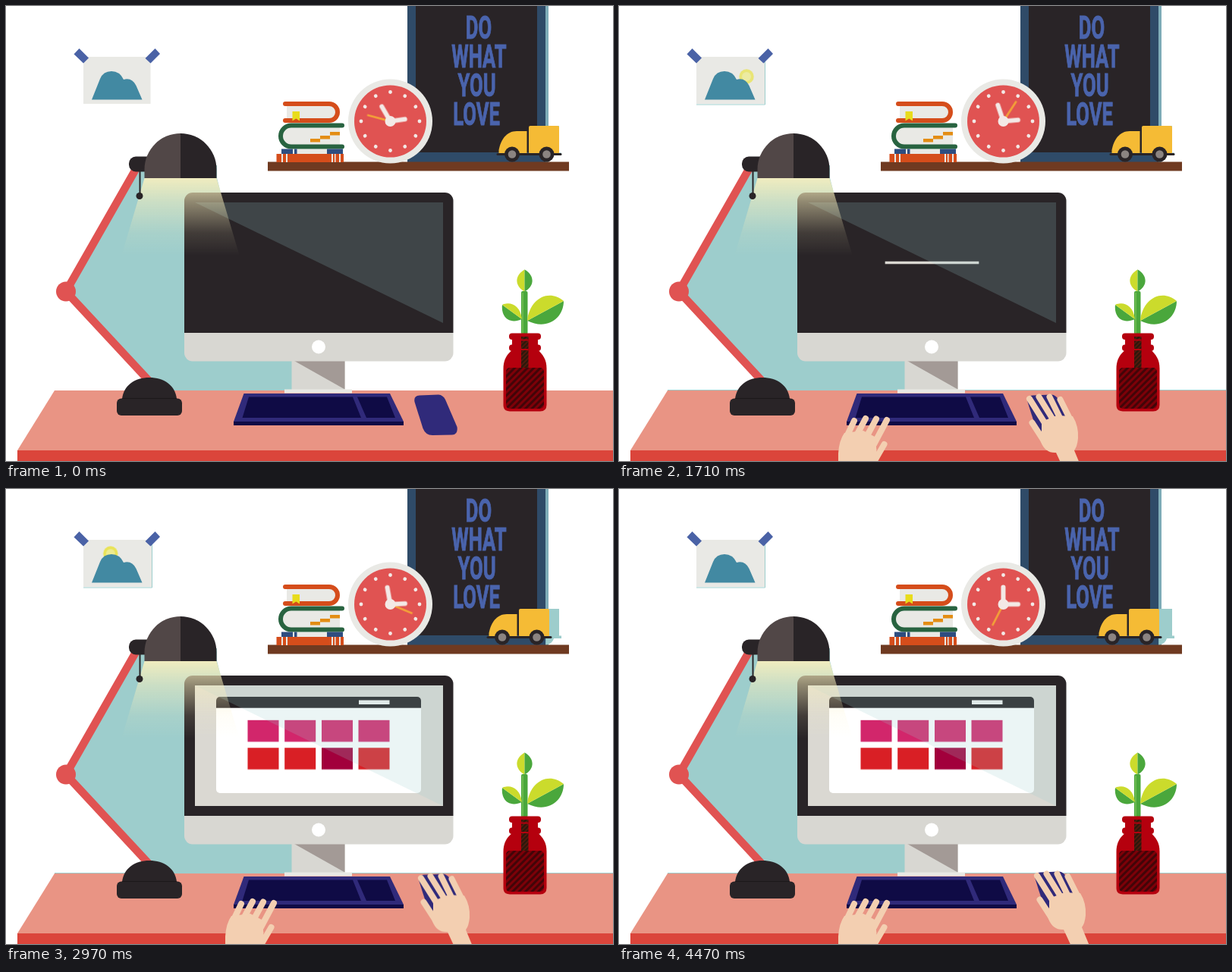
Recreate the animation shown at these times as an HTML page without scripts. Size 800x600 px, loop 4500 ms.

```html
<!DOCTYPE html>
<html lang="en">
<head>
<meta charset="utf-8">
<title>Desk</title>
<style>
html, body { margin: 0; width: 100%; height: 100%; overflow: hidden; background: #fff; }
svg { display: block; width: 100vw; height: 100vh; }

.anim { animation: 4500ms linear infinite both; }
.dark { fill: #292427; }
.teal { fill: #9dcdcc; }
.coral { fill: #e05352; }
.paper { fill: #e9e9e5; }
.orange { fill: #d54d1b; }
.navy { fill: #302a7a; }
.deep { fill: #0f0b45; }
.lime { fill: #cbdb2c; }
.green { fill: #4aa73c; }
.red { fill: #b5000e; }
.skin { fill: #f3cfb1; stroke: none; }
.fingers { fill: none; stroke: #f3cfb1; stroke-width: 8; stroke-linecap: round; }
.slogan { font: 700 42px Roboto, sans-serif; fill: #4a64ad; stroke: #4a64ad; text-anchor: middle; }

/* clock */
.tick { transform-origin: 506.5px 152px; animation-name: turn; }
@keyframes turn { from { transform: rotate(var(--from)); } to { transform: rotate(var(--to)); } }

/* truck backs up and returns */
.truck { animation-name: drive; animation-timing-function: ease-in-out; }
@keyframes drive {
  0%, 1.33%, 37.33%, 39.33%, 75.33%, 77.33% { transform: none; }
  16%, 23.33%, 54%, 61.33%, 92%, 100% { transform: translateX(-17px); }
}

/* sun rises and sets twice */
.sun { animation-name: sun; }
@keyframes sun {
  0%, 5.78%, 56.67% { transform: translate(-26px, 18px); opacity: 0; }
  16%, 66.9% { transform: translate(-12px, 5px); opacity: .85; }
  25.1%, 76% { transform: none; opacity: 1; }
  31.1%, 82% { transform: translate(9px, 4px); opacity: .9; }
  38%, 88.9% { transform: translate(17px, 14px); opacity: .62; }
  46.67%, 97.6%, 100% { transform: translate(26px, 27px); opacity: 0; }
}

/* screen opens from a line */
.panel { transform-origin: 412.5px 338.5px; animation-name: power; }
@keyframes power {
  0%, 35.33% { transform: scale(0, .022); }
  38% { transform: scale(.373, .022); }
  40.67% { transform: scale(1, .022); }
  44.67%, 100% { transform: none; }
}

.window { animation-name: rise; animation-timing-function: ease-in-out; }
@keyframes rise {
  0%, 45.33% { transform: translateY(150px); animation-timing-function: linear; }
  46.67% { transform: translateY(131px); animation-timing-function: ease-out; }
  52% { transform: translateY(-10px); }
  56.67% { transform: translateY(5px); }
  60.67%, 100% { transform: none; }
}

.tile { transform-box: fill-box; transform-origin: center; animation-name: pop; animation-delay: calc(var(--i) * 30ms); }
@keyframes pop {
  0%, 49.33% { transform: scale(0); }
  52% { transform: scale(.94); }
  53.33% { transform: scale(1.1); }
  54% { transform: scale(1.08); }
  54.67% { transform: scale(1.03); }
  56% { transform: scale(.96); }
  56.67% { transform: scale(.95); }
  60%, 100% { transform: none; }
}

/* hands */
.enter { animation-name: enter; animation-timing-function: ease-out; }
@keyframes enter { 0%, 2% { transform: translateY(100px); } 14%, 100% { transform: none; } }
.push { animation-name: push; animation-timing-function: ease-in-out; }
@keyframes push { 0%, 61% { transform: none; } 70%, 100% { transform: translate(10px, -8px); } }

.edge { animation-name: edge; animation-timing-function: step-end; }
@keyframes edge { 0% { opacity: 0; } .6%, 100% { opacity: 1; } }
</style>
</head>
<body>
<svg viewBox="0 0 800 600" preserveAspectRatio="none">
  <defs>
    <linearGradient id="glow" gradientUnits="userSpaceOnUse" x1="0" y1="227" x2="0" y2="330">
      <stop offset="0" stop-color="#fbf0bd" stop-opacity=".88"/>
      <stop offset=".3" stop-color="#fbf0bd" stop-opacity=".5"/>
      <stop offset=".7" stop-color="#fbf0bd" stop-opacity=".12"/>
      <stop offset="1" stop-color="#fbf0bd" stop-opacity="0"/>
    </linearGradient>
    <pattern id="hatch" width="6" height="6" patternUnits="userSpaceOnUse" patternTransform="rotate(45)">
      <rect width="6" height="6" fill="#7d0008"/>
      <rect width="3" height="6" fill="#420508"/>
    </pattern>
    <pattern id="stemHatch" width="4" height="4" patternUnits="userSpaceOnUse" patternTransform="rotate(45)">
      <rect width="4" height="4" fill="#5a1a0c"/>
      <rect width="2.4" height="4" fill="#2a180c"/>
    </pattern>
    <clipPath id="screen"><rect x="249" y="259" width="327" height="159"/></clipPath>
    <clipPath id="case"><rect x="235" y="246" width="354.5" height="222.5" rx="11"/></clipPath>
    <clipPath id="frame"><rect x="277" y="274" width="270" height="127" rx="5"/></clipPath>
    <clipPath id="shade"><path d="M182.500 227V215.500a47.500 47.500 0 0 1 95 0V227z"/></clipPath>
    <circle id="dot" cx="506.500" cy="113.500" r="2.400"/>
    <g id="dots"><use href="#dot"/><use href="#dot" transform="rotate(30 506.500 152)"/><use href="#dot" transform="rotate(60 506.500 152)"/></g>
    <rect id="tile" width="41" height="28.500"/>
  </defs>

  <!-- taped picture -->
  <rect class="paper" x="102" y="67" width="88.500" height="62"/>
  <g class="anim edge">
    <path class="paper" d="M190 67h2v62H102v-1h88z"/>
    <path d="M102 130H192.500V67" fill="none" stroke="#9dcdcc"/>
    <rect class="teal" x="64" y="506" width="736" height="1"/>
  </g>
  <g class="anim sun">
    <circle cx="151" cy="79" r="9.700" fill="#e9e22f"/>
    <circle cx="151" cy="79" r="6" fill="#eeec78"/>
  </g>
  <path d="M113 123.500L124 96Q128 86 139 86Q150 86 155 97Q166 94 171.500 105L179.500 123.500z" fill="#4289a2"/>
  <path d="M96.500 56L109 68.500L102 75.500L89.500 63.500zM196.500 56L203 63L190.500 75.500L183.500 69z" fill="#4a62a6"/>

  <!-- poster -->
  <rect x="529" width="182" height="206" fill="#2f4b68"/>
  <rect x="711" width="4" height="206" fill="#7fadb8"/>
  <rect class="dark" x="540" width="160" height="193"/>
  <g class="slogan">
    <text transform="translate(623 43) scale(.61 1)">DO</text>
    <text transform="translate(623.500 81) scale(.61 1)">WHAT</text>
    <text transform="translate(620.500 119) scale(.61 1)">YOU</text>
    <text transform="translate(620 156.500) scale(.61 1)">LOVE</text>
  </g>

  <!-- shelf and books -->
  <rect x="345" y="205.500" width="397" height="12" fill="#6f3a21"/>
  <path class="paper" d="M370 130H426a10 10 0 0 1 0 20H370zM440 158H376a13 13 0 0 0 0 27H440z"/>
  <g fill="none" stroke-width="6" stroke-linecap="round">
    <path d="M368 129H426a11 11 0 0 1 0 22H368" stroke="#d54d1b"/>
    <path d="M443 157.500H376a14 14 0 0 0 0 28H443" stroke="#286340"/>
  </g>
  <path d="M377.500 139h9.500v12.500l-4.700-3l-4.800 3z" fill="#e8dc1c"/>
  <path d="M401 175h13v4.500h-13zM414 171h13v4.500h-13zM427 166h13v4.500h-13z" fill="#e38d14"/>
  <rect class="paper" x="378" y="189" width="46" height="6"/>
  <path d="M363 188.500h15v7h-15zM380 188.500h3.500v7H380zM423 188.500h21v7h-21z" fill="#2e4d80"/>
  <rect class="orange" x="356.500" y="195" width="88.500" height="11"/>
  <path class="paper" d="M363 195h2v11h-2zM369 195h2v11h-2zM429 195h2v11h-2zM433 195h1.500v11H433zM439 195h2v11h-2z"/>

  <!-- clock -->
  <circle class="paper" cx="506.500" cy="152" r="55.500"/>
  <circle class="coral" cx="506.500" cy="152" r="47.500"/>
  <g fill="#f3e9e6">
    <use href="#dots"/>
    <use href="#dots" transform="rotate(90 506.500 152)"/>
    <use href="#dots" transform="rotate(180 506.500 152)"/>
    <use href="#dots" transform="rotate(270 506.500 152)"/>
  </g>
  <path class="anim tick" style="--from:285deg;--to:569deg" d="M506.500 152V120.500" stroke="#f4a636" stroke-width="2.500"/>
  <g stroke="#f3e9e6" stroke-width="6" stroke-linecap="round">
    <path class="anim tick" style="--from:-30deg;--to:0deg" d="M506.500 152V129.500"/>
    <path class="anim tick" style="--from:82deg;--to:90deg" d="M506.500 152V132.500"/>
  </g>
  <circle cx="506.500" cy="152" r="7" fill="#f3e9e6"/>

  <!-- truck -->
  <path class="teal" d="M711.500 158H729V193.500H732V197H722A10 10 0 0 1 711.500 205z"/>
  <g class="anim truck">
    <path d="M649.500 195V190C652 176 660 165 673 165H686.500V195z" fill="#f5bb35"/>
    <rect x="689" y="158" width="40" height="37" rx="2" fill="#f5bb35"/>
    <path d="M648 195.500H731" stroke="#292427" stroke-width="3" stroke-linecap="round"/>
    <g class="dark"><circle cx="667" cy="195.500" r="10"/><circle cx="712.500" cy="195.500" r="10"/></g>
    <g fill="#8b8481"><circle cx="667" cy="195.500" r="5.300"/><circle cx="712.500" cy="195.500" r="5.300"/></g>
  </g>

  <!-- desk -->
  <path class="teal" d="M175 205L79 376L190 500V507H377V460H240V250H284L278 227V210z"/>
  <path d="M64 507H800V586H15z" fill="#e99484"/>
  <rect x="15" y="586" width="785" height="14" fill="#db453b"/>

  <!-- monitor -->
  <rect x="376.500" y="468" width="70" height="38" fill="#d8d7d2"/>
  <path d="M380 468H446.500V505.500z" fill="#a39a96"/>
  <rect x="367" y="505.500" width="89" height="5" fill="#e9e9e4"/>
  <g clip-path="url(#case)">
    <rect class="dark" x="235" y="246" width="355" height="185"/>
    <rect x="235" y="431" width="355" height="38" fill="#d8d7d2"/>
  </g>
  <circle cx="412" cy="449.500" r="9" fill="#fff"/>
  <g clip-path="url(#screen)">
    <rect class="anim panel" x="249" y="259" width="327" height="159" fill="#dad8d2"/>
    <g class="anim window">
      <g clip-path="url(#frame)">
        <rect x="277" y="274" width="270" height="127" fill="#fff"/>
        <rect x="277" y="274" width="270" height="14.700" fill="#241e21"/>
      </g>
      <rect x="465" y="278.500" width="40.500" height="5.500" fill="#f2f2f0"/>
      <g fill="#d2266b">
        <use class="anim tile" style="--i:0" href="#tile" x="318.500" y="304.800"/>
        <use class="anim tile" style="--i:1" href="#tile" x="367.200" y="304.800"/>
        <use class="anim tile" style="--i:2" href="#tile" x="416" y="304.800"/>
        <use class="anim tile" style="--i:3" href="#tile" x="464.500" y="304.800"/>
      </g>
      <g fill="#d91f25">
        <use class="anim tile" style="--i:4" href="#tile" x="318.500" y="341.300"/>
        <use class="anim tile" style="--i:5" href="#tile" x="367.200" y="341.300"/>
        <use class="anim tile" style="--i:6" href="#tile" x="416" y="341.300" fill="#a2003c"/>
        <use class="anim tile" style="--i:7" href="#tile" x="464.500" y="341.300"/>
      </g>
    </g>
  </g>
  <path d="M249 259H576V418z" fill="#9dcdcc" opacity=".2"/>

  <!-- lamp -->
  <path d="M182.500 227H277.500L308 330H152z" fill="url(#glow)"/>
  <path d="M174 210L79 376.500L190 496" fill="none" stroke="#e05352" stroke-width="10.500"/>
  <circle class="coral" cx="79" cy="376.500" r="13"/>
  <rect class="dark" x="162" y="198.500" width="40" height="20" rx="9"/>
  <path d="M176.500 215V250" stroke="#292427" stroke-width="2"/>
  <circle class="dark" cx="176" cy="250.500" r="4.500"/>
  <g clip-path="url(#shade)">
    <rect x="182" y="168" width="48" height="60" fill="#514747"/>
    <rect class="dark" x="230" y="168" width="48" height="60"/>
  </g>
  <path class="dark" d="M153 518C155 500 170 490 189 490S223 500 225 518z"/>
  <rect class="dark" x="146" y="517.500" width="86" height="22.500" rx="6"/>
  <path d="M153 517.500H225" stroke="#1c181a"/>

  <!-- keyboard -->
  <path class="navy" d="M313.500 511H506L524 548H300z"/>
  <path class="deep" d="M300 548H524V553H300zM320 515.500H457L468 543H311.500zM463 515.500H502L513 543H475z"/>

  <!-- plant -->
  <rect class="green" x="679" y="376" width="8.500" height="57" rx="2"/>
  <path d="M681 378V432" stroke="#6cba51" stroke-width="2"/>
  <path class="lime" d="M683.500 347.500C669 356 671 370 683.500 376.500z"/>
  <path class="green" d="M683.500 347.500C698 356 696 370 683.500 376.500zM654 394C652 411 664 420 680 413zM687 415L735 389C735 412 713 428 687 415z"/>
  <path class="lime" d="M654 394C664 389 678 394 680 413zM687 415C690 386 715 372 735 389z"/>
  <g class="red">
    <rect x="663" y="431.500" width="42" height="8.500" rx="4"/>
    <rect x="667" y="438" width="34" height="20"/>
    <rect x="663" y="446.500" width="42" height="8.500" rx="4"/>
    <path d="M668 453C660 459 655.500 467 655.500 478V526q0 8.500 8.500 8.500H704q8.500 0 8.500-8.500V478C712.500 467 708 459 700 453z"/>
  </g>
  <rect x="679" y="436" width="9.500" height="41" fill="url(#stemHatch)"/>
  <path d="M679 440.500h9.500M679 453h9.500" stroke="#b5000e" stroke-width="2"/>
  <rect x="659" y="477" width="50" height="54" rx="5" fill="url(#hatch)"/>

  <!-- mouse and hands -->
  <g class="anim push">
    <path class="navy" d="M545 513.500L570 512.500Q576 513 579 519L594.500 555Q596 565 588 565.500L562 566Q553 566 549.500 557L538.500 522Q537 514 545 513.500z"/>
    <g class="anim enter">
      <path class="fingers" d="M541 518L563 553M553.500 515.500L573 547M567.500 515.500L582 545M581.500 519L596 548M544.500 549.500L561 575"/>
      <path class="skin" d="M557 548L577 540L598 541Q606 554 605 570Q604 581 600 586L612 615H588L576 589Q562 590 556 575Q553 567 557 560z"/>
    </g>
  </g>
  <g class="anim enter">
    <path class="fingers" d="M310 547L299 570M325 544L310 572M339 544.500L322 576M353 546L336 578M349.500 578L335 603"/>
    <path class="skin" d="M289 610V590Q290 573 297 563L322 560L339 569Q338 580 340 588L332 610z"/>
  </g>
</svg>
</body>
</html>
```
